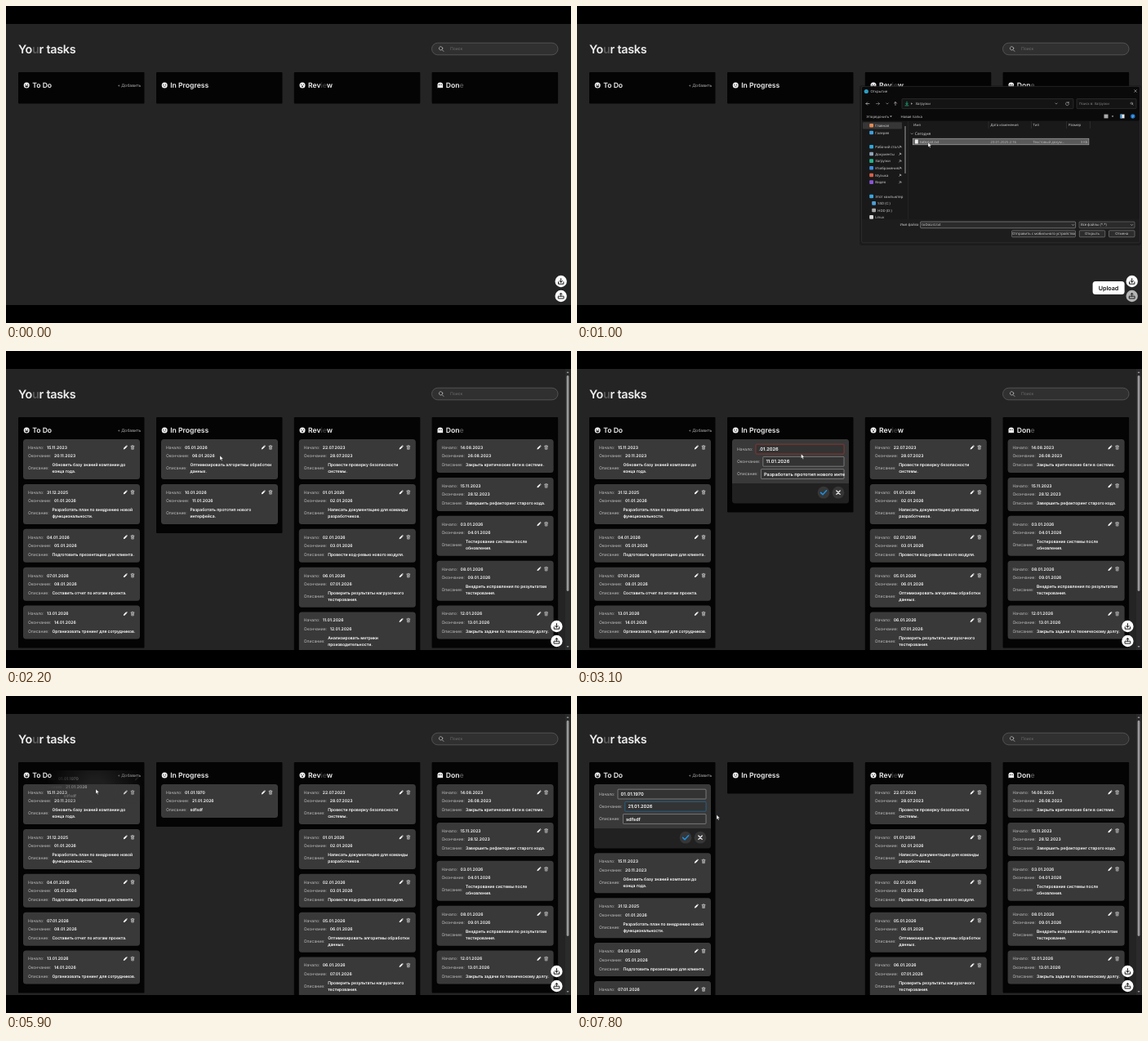
These frames come from a looping animation (692x388 px, 8000 ms). An HTML page:

```html
<!DOCTYPE html>
<html lang="ru">
<head>
<meta charset="utf-8">
<title>Your tasks</title>
<style>
html, body { margin: 0; width: 100%; height: 100%; overflow: hidden; background: #000; }
svg { display: block; width: 692px; height: 388px; }
text { font-family: Inter, sans-serif; text-rendering: geometricPrecision; white-space: pre; }
.win text { font-family: "Open Sans", "Noto Sans", sans-serif; }
</style>
</head>
<body>
<svg id="stage" viewBox="0 0 692 388"></svg>
<script>
const LOOP = 8000, STEP = 100;
const OPEN = 400, PICK = 900, CLOSE = 1200, LOADED = 1300;
const DROP1 = 2000, DROP2 = 2600, EDIT1 = 2900, SAVED = 5100, DROP3 = 6000, EDIT2 = 6900;
const COL_X = [15, 184, 352.8, 521.6], COL_W = 154.5, CARD_W = 143, TOP = 108;
const SMALL = 5.04, INPUT = 5.7;

// start, end, description lines, column
const tasks = [
  ['15.11.2023', '20.11.2023', 'Обновить базу знаний компании до|конца года.', 0],
  ['31.12.2025', '01.01.2026', 'Разработать план по внедрению новой|функциональности.', 0],
  ['04.01.2026', '05.01.2026', 'Подготовить презентацию для клиента.', 0],
  ['07.01.2026', '08.01.2026', 'Составить отчет по итогам проекта.', 0],
  ['13.01.2026', '14.01.2026', 'Организовать тренинг для сотрудников.', 0],
  ['01.01.2026', '02.01.2026', 'Написать документацию для команды|разработчиков.', 1],
  ['05.01.2026', '06.01.2026', 'Оптимизировать алгоритмы обработки|данных.', 1],
  ['10.01.2026', '11.01.2026', 'Разработать прототип нового|интерфейса.', 1],
  ['22.07.2023', '28.07.2023', 'Провести проверку безопасности|системы.', 2],
  ['02.01.2026', '03.01.2026', 'Провести код-ревью нового модуля.', 2],
  ['06.01.2026', '07.01.2026', 'Проверить результаты нагрузочного|тестирования.', 2],
  ['11.01.2026', '12.01.2026', 'Анализировать метрики|производительности.', 2],
  ['14.08.2023', '26.08.2023', 'Закрыть критические баги в системе.', 3],
  ['15.11.2023', '28.12.2023', 'Завершить рефакторинг старого кода.', 3],
  ['03.01.2026', '04.01.2026', 'Тестирование системы после|обновления.', 3],
  ['08.01.2026', '09.01.2026', 'Внедрить исправления по результатам|тестирования.', 3],
  ['12.01.2026', '13.01.2026', 'Закрыть задачи по техническому долгу.', 3]
].map(([start, end, text, col], id) => ({ id, start, end, text, col }));
const FIRST = 5, SECOND = 6, EDITED = 7;

const drags = [[FIRST, 1700, DROP1], [SECOND, 2300, DROP2], [EDITED, 5300, DROP3]];

// time, x, y
const path = [
  [400, 676, 345], [900, 430, 167], [1200, 430, 167], [1500, 353, 170], [1700, 265, 125],
  [2000, 425, 165], [2200, 262, 128], [2300, 262, 128], [2600, 430, 250], [2850, 315, 117],
  [2900, 315, 117], [3100, 274.5, 126], [3700, 274.5, 128], [4000, 275, 134], [4200, 275, 134],
  [4700, 275, 147], [4800, 275, 149], [5000, 301, 171], [5100, 301, 171], [5300, 265, 131],
  [5900, 110, 114], [6000, 108, 115], [6400, 120, 130], [6600, 122, 130], [6900, 146, 117],
  [7300, 150, 138], [7500, 130, 134], [7800, 171, 145.5], [8000, 171, 145.5]
];

// typed values: the last entry whose time has come
const startText = [[0, '10.01.2026'], [3000, '0.01.2026'], [3100, '.01.2026'], [3600, '2.01.2026']];
const endText = [[0, '11.01.2026'], [4200, '1.01.2026'], [4300, '.01.2026'], [4400, '2.01.2026'], [4500, '21.01.2026']];
const noteText = [[0, 'Разработать прототип нового инте'], [4800, ''], [4900, 'sdf'], [5000, 'sdfsdf']];
const at = (list, t) => list.filter(e => e[0] <= t).pop()[1];

const rect = (x, y, w, h, fill, r = 0, extra = '') =>
  `<rect x="${x}" y="${y}" width="${w}" height="${h}" rx="${r}" fill="${fill}" ${extra}/>`;
const box = (x, y, w, h, fill, line, r = 0) => rect(x, y, w, h, fill, r, `stroke="${line}" stroke-width=".6"`);
const dot = (x, y, r, fill) => `<circle cx="${x}" cy="${y}" r="${r}" fill="${fill}"/>`;
const line = (x, y, d, color, w = .8) =>
  `<path transform="translate(${x} ${y})" d="${d}" fill="none" stroke="${color}" stroke-width="${w}" stroke-linecap="round" stroke-linejoin="round"/>`;
const shape = (x, y, d, fill) => `<path transform="translate(${x} ${y})" d="${d}" fill="${fill}"/>`;
// y is the middle of the capitals
const text = (x, y, s, size = SMALL, fill = '#f4f4f4', weight = 400, extra = '') =>
  `<text x="${x}" y="${y + size * .36}" font-size="${size}" fill="${fill}" font-weight="${weight}" ${extra}>${s}</text>`;
const dim = (s, fill) => `<tspan fill="${fill}">${s}</tspan>`;

function cursorAt(t) {
  const i = Math.max(1, path.findIndex(p => p[0] >= t));
  const [t0, x0, y0] = path[i - 1], [t1, x1, y1] = path[i];
  const k = Math.max(0, (t - t0) / (t1 - t0));
  return [x0 + (x1 - x0) * k, y0 + (y1 - y0) * k];
}

const arrow = (x, y) =>
  `<path transform="translate(${x} ${y})" d="M0 0V5.6L1.3 4.4 2.2 6.4 3.1 6 2.2 4.1H4Z" fill="#fff" stroke="#111" stroke-width=".3"/>`;
const beam = (x, y) => line(x, y, 'M-1 -2.5H1M0 -2.5V2.5M-1 2.5H1', '#999', .4);

function face(x, y, kind) {
  if (kind == 3) {
    return shape(x, y, 'M-3.3 3.5V-.3A3.3 3.3 0 0 1 3.3 -.3V3.5L2 2.8 1 3.5 0 2.8 -1 3.5 -2 2.8Z', '#f4f4f4') +
      dot(x - 1.2, y - .6, .6, '#111') + dot(x + 1.2, y - .6, .6, '#111');
  }
  const mouth = [shape(x, y, 'M-2 .4H2A2 2 0 0 1 -2 .4Z', '#111'),
    line(x, y, 'M-1.6 .9Q0 2.6 1.6 .9', '#111', .6),
    dot(x, y + 1.3, .9, '#111')][kind];
  return dot(x, y, 3.5, '#f4f4f4') + dot(x - 1.3, y - .9, .6, '#111') + dot(x + 1.3, y - .9, .6, '#111') + mouth;
}

const pencil = (x, y) => shape(x, y, 'M-2.4 2.4L-2 .7 .8 -2 2 -.8 -.7 2Z M1.1 -2.3L1.7 -2.7 2.7 -1.7 2.3 -1.1Z', '#fff');
const bin = (x, y) => line(x, y, 'M-2 -1.6H2M-.7 -2.3H.7M-1.5 -1.4L-1.3 2.3H1.3L1.5 -1.4M-.4 -.4V1.3M.5 -.4V1.3', '#e4e4e4', .55);
const lens = (x, y, s, color, w) => line(x, y, `M${s} ${s}L${s * .4} ${s * .4}M${s * .6} ${-s * .2}A${s * .75} ${s * .75} 0 1 1 ${s * .6} ${-s * .25}Z`, color, w);
const label = (x, y, s) => text(x + 5.9, y, s, SMALL, '#bdbdbd');

function card(c, x, y) {
  const lines = c.text.split('|');
  return rect(x, y, CARD_W, c.h, '#393939', 3.5) +
    label(x, y + 10, 'Начало:') + text(x + 29, y + 10, c.start, SMALL, '#fff', 600) +
    label(x, y + 20.6, 'Окончание:') + text(x + 38, y + 20.6, c.end, SMALL, '#fff', 600) +
    label(x, y + 31.6 + (lines.length - 1) * 4, 'Описание:') +
    lines.map((s, i) => text(x + 35.4, y + 31.6 + i * 8, s, SMALL, '#fff', 600)).join('') +
    pencil(x + 125.2, y + 10) + bin(x + 134, y + 10);
}

function field(x, y, right, s, border) {
  return box(x, y, right - x, 11.8, '#333', border, .8) + text(x + 3.6, y + 5.9, s, INPUT, '#fff', 600);
}

function editor(x, y, t) {
  const again = t >= EDIT2, grey = '#a5a5a5', blue = '#1f79b5';
  const red = t < 3900 ? '#b8362c' : '#7e2e2a';
  const onEnd = again ? t >= 7500 : t >= 3900 && t < 4800;
  const end = again ? '21.01.2026' : at(endText, t);
  const right = x + 137;
  return rect(x, y, CARD_W, 78.4, '#212121', 3.5) +
    shape(x, y, `M0 54V3.5A3.5 3.5 0 0 1 3.5 0H${CARD_W - 3.5}A3.5 3.5 0 0 1 ${CARD_W} 3.5V54Z`, '#393939') +
    label(x, y + 12.2, 'Начало:') +
    field(x + 29, y + 6.2, right, again ? '01.01.1970' : at(startText, t), again || t < 3000 ? grey : red) +
    label(x, y + 27.4, 'Окончание:') + field(x + 37.8, y + 21.4, right, end, onEnd ? blue : grey) +
    (onEnd && end.length > 9 ? rect(x + 47.5, y + 24.8, .4, 5, '#ccc') : '') +
    label(x, y + 42.6, 'Описание:') +
    field(x + 35.4, y + 36.6, right, again ? 'sdfsdf' : at(noteText, t), !again && t >= 4800 ? blue : grey) +
    dot(x + 112, y + 65.2, 7.4, '#363636') + line(x + 112, y + 65.2, 'M-3.4 .2L-1 2.6 3.6 -2.4', '#1d8fe3', 1.5) +
    dot(x + 130, y + 65.2, 7.4, '#363636') + line(x + 130, y + 65.2, 'M-2.2 -2.2L2.2 2.2M2.2 -2.2L-2.2 2.2', '#eee', 1.3);
}

// Columns, order and positions of the cards at a given time
function layout(t) {
  const editing = t >= EDIT1 && t < SAVED || t >= EDIT2;
  const moved = { [FIRST]: [DROP1, 2], [SECOND]: [DROP2, 2], [EDITED]: [DROP3, 0] };
  const key = c => c.start.split('.').reverse().join('');
  const ends = [TOP, TOP, TOP, TOP];
  const cards = t < LOADED ? [] : tasks.map(task => {
    const c = { ...task }, move = moved[c.id];
    if (move && t >= move[0]) c.col = move[1];
    if (c.id == EDITED && t >= SAVED) Object.assign(c, { start: '01.01.1970', end: '21.01.2026', text: 'sdfsdf' });
    c.edit = editing && c.id == EDITED;
    c.h = c.edit ? 78.4 : c.text.includes('|') ? 49 : 41;
    return c;
  }).sort((a, b) => key(a) < key(b) ? -1 : 1);
  for (const c of cards) {
    c.x = COL_X[c.col] + 6;
    c.y = ends[c.col];
    ends[c.col] += c.h + 5.9;
  }
  return { cards, bottoms: ends.map(e => e == TOP ? 119.5 : e + 5.1) };
}

function board(t) {
  const { cards, bottoms } = layout(t);
  const names = ['To Do', 'In Progress', `Rev${dim('ie', '#3c3c3c')}w`, `Don${dim('e', '#555')}`];
  return rect(0, 22, 692, 344, '#242424') +
    text(15, 52.5, `Yo${dim('u', '#5a5a5a')}r tasks`, 14.4, '#eee', 600, 'letter-spacing="-.28"') +
    box(521.5, 45.2, 154.5, 14.6, '#303030', '#6c6c6c', 7.3) + lens(533, 52.5, 2.9, '#bbb', .8) +
    text(544, 52.6, 'Поиск', SMALL, '#6d6d6d') +
    names.map((name, i) => rect(COL_X[i], 81, COL_W, bottoms[i] - 81, '#040405', 1) +
      face(COL_X[i] + 10.2, 97, i) + text(COL_X[i] + 17.2, 97.2, name, 8.64, '#f0f0f0', 600)).join('') +
    text(136.5, 97.3, '+ Добавить', SMALL, '#b0b0b0') +
    cards.map(c => c.edit ? editor(c.x, c.y, t) : card(c, c.x, c.y)).join('');
}

function buttons(t) {
  const scroll = t >= DROP1, x = scroll ? 674.4 : 679.7, hover = t >= 100 && t < LOADED;
  const tray = 'M-3.2 .8V3.2H3.2V.8';
  let out = '';
  if (scroll) {
    out += rect(685, 22, 6, 344, '#2b2b2b') + rect(686.6, 30, 2.8, t >= DROP3 && t < EDIT2 ? 258 : 264, '#9a9a9a', 1.4) +
      shape(688, 26, 'M-1.5 1L0 -1 1.5 1Z', '#9a9a9a') + shape(688, 362, 'M-1.5 -1L0 1 1.5 -1Z', '#9a9a9a');
  }
  out += dot(x, 337, 7.2, '#fff') + line(x, 337, tray + 'M0 -3.4V1M-1.8 -.6L0 1.2 1.8 -.6', '#111', 1) +
    dot(x, 355, 7.2, hover ? '#b5b5b5' : '#fff') +
    line(x, 355, 'M-3.4 .6V3H3.4V.6ZM0 .4V-3.4M-1.5 -2L0 -3.6 1.5 -2', '#222', 1);
  if (hover) {
    out += `<g opacity="${t < 200 ? .5 : 1}">` + rect(631.6, 337, 39, 16, '#fff', 3.5) +
      text(651, 345, 'Upload', 7.2, '#111', 600, 'text-anchor="middle"') + '</g>';
  }
  return out;
}

function dialog(t) {
  const picked = t >= PICK, S = 4.3, pale = '#d8d8d8';
  const say = (x, y, s, fill = pale, extra) => text(x, y, s, S, fill, 400, extra);
  const chevron = (x, y) => line(x, y, 'M-1.2 -.6L0 .6 1.2 -.6', pale, .5);
  const pin = y => line(396, y, 'M-1.4 1.4L0 0M-.8 -.8L.8 .8M0 -1.2L1.2 0', pale, .6);
  const places = [
    [146.3, 'Главная', '#e58a55'], [155, 'Галерея', '#3f9fe0'], [172.3, 'Рабочий стол', '#2fa8dc', 1],
    [181, 'Документы', '#8fa6bb', 1], [189.6, 'Загрузки', '#21b58a', 1], [198.3, 'Изображения', '#3d8fe0', 1],
    [207, 'Музыка', '#d9604a', 1], [215.6, 'Видео', '#8b54d6', 1], [233, 'Этот компьютер', '#39a5df'],
    [241.4, 'SSD (C:)', '#4b9fd8', 0, 3], [250, 'HDD (D:)', '#aaa', 0, 3], [258.4, 'Linux', '#ddd']
  ];
  const button = (x, w, s) => box(x, 274.8, w, 8, '#2c2c2c', '#8a8a8a', 1) + say(x + w / 2, 278.8, s, pale, 'text-anchor="middle"');
  return `<g class="win" opacity="${t < OPEN + STEP ? .7 : 1}">` +
    rect(346, 97, 345, 196, '#000', 3, 'opacity=".25"') +
    box(348.6, 98.4, 340.8, 191.4, '#1d1d1d', '#3a3a3a', 2) + rect(349, 98.8, 340, 42, '#0a0a0b', 2) +
    dot(354.3, 104.5, 2.6, '#2a9fc4') + say(359.5, 104.5, 'Открытие') +
    line(684, 104, 'M-1.4 -1.4L1.4 1.4M1.4 -1.4L-1.4 1.4', pale, .5) +
    line(356, 119.5, 'M2 0H-2M-.4 -1.6L-2 0 -.4 1.6', pale, .6) +
    line(368.5, 119.5, 'M-2 0H2M.4 -1.6L2 0 .4 1.6', '#999', .6) +
    chevron(380, 119.5) + line(390, 119.5, 'M0 2V-2M-1.6 -.4L0 -2 1.6 -.4', pale, .6) +
    box(398, 113.6, 210, 12, '#141414', '#3c3c3c', 1) +
    line(404, 119.5, 'M0 -2.4V1M-1.4 -.4L0 1 1.4 -.4M-2 2.4H2', '#21b58a', .8) +
    shape(410, 119.5, 'M-.7 -1.2L.8 0 -.7 1.2Z', pale) + say(414.5, 119.5, 'Загрузки') +
    chevron(587, 119.5) + line(600.5, 119.5, 'M1.6 -1A2 2 0 1 0 2 .4M1.7 -2.2V-.8H.4', pale, .5) +
    box(612, 113.6, 73, 12, '#141414', '#3c3c3c', 1) + say(615, 119.5, 'Поиск в: Загрузки', '#8c8c8c') + lens(679.5, 119.5, 1.6, pale, .5) +
    say(354.5, 135, 'Упорядочить') + shape(384.5, 135, 'M-1.3 -.6H1.3L0 .9Z', pale) + say(396.5, 135, 'Новая папка') +
    rect(645.5, 132.6, 5, 4.8, '#aaa') + shape(656, 135, 'M-1.2 -.6H1.2L0 .9Z', pale) +
    rect(665.5, 132.6, 5, 4.8, '#e8e8e8') + rect(665.5, 132.6, 2, 4.8, '#3a8fd0') +
    dot(680.8, 135, 2.7, '#1b78cf') + say(679.8, 135, '?', '#fff') +
    rect(349, 140.8, 340, 120.4, '#191919') + rect(350, 142.2, 48, 8.2, '#363636', 1) +
    places.map(([y, s, color, pinned, indent = 0]) =>
      rect(358.2 + indent, y - 2.3, 4.8, 4.6, color, 1) + say(365.3 + indent, y, s) + (pinned ? pin(y) : '')).join('') +
    rect(401.4, 147, 1.2, 58, '#8a8a8a', .6) + rect(405, 141, .4, 120, '#333') +
    [[412, 'Имя'], [506.5, 'Дата изменения'], [558.5, 'Тип'], [602, 'Размер']].map(([x, s]) => say(x, 145.6, s)).join('') +
    [503.8, 556, 599.5, 628].map(x => rect(x, 141, .4, 9, '#444')).join('') +
    chevron(410.3, 156.4) + text(413.8, 156.4, 'Сегодня', 4.9, pale) +
    (picked ? box(411.3, 162.2, 215.6, 7.6, '#5a5a5a', '#b8b8b8') : '') +
    rect(413.8, 163.4, 4, 5, '#eee', .4) + say(420, 166, 'toDoList.txt') + say(506.5, 166, '23.01.2025 2:16', '#bbb') +
    say(558.5, 166, 'Текстовый докум...', '#bbb') + say(625.5, 166, '3 КБ', '#bbb', 'text-anchor="end"') +
    say(418.5, 267.8, 'Имя файла', pale, 'text-anchor="end"') + box(420.6, 264, 190, 7.8, '#2a2a2a', '#a0a0a0', 1) +
    (picked ? say(422.3, 267.8, 'toDoList.txt') : '') + chevron(607.5, 268) +
    box(615, 264, 68, 7.8, '#2a2a2a', '#777', 1) + say(617, 267.8, 'Все файлы (*.*)') + chevron(679.5, 268) +
    button(532.5, 78, 'Отправить с мобильного устройства') + button(615.3, 31.4, 'Открыть') + button(651.5, 31.5, 'Отмена') + '</g>';
}

function ghost(t) {
  const drag = drags.find(([, from, to]) => t > from && t < to);
  if (!drag) return '';
  const c = layout(t).cards.find(c => c.id == drag[0]);
  const [gx, gy] = cursorAt(drag[1]), [x, y] = cursorAt(t);
  return `<defs><radialGradient id="fade" gradientUnits="userSpaceOnUse" cx="${x}" cy="${y}" r="62">
    <stop offset=".2" stop-color="#fff"/><stop offset="1" stop-color="#000"/></radialGradient>
    <mask id="soft" maskUnits="userSpaceOnUse" x="0" y="0" width="692" height="388">${rect(0, 0, 692, 388, 'url(#fade)')}</mask></defs>
    <g mask="url(#soft)"><g opacity=".5">${card(c, c.x + x - gx, c.y + y - gy)}</g></g>`;
}

function scene(t) {
  const [x, y] = cursorAt(t);
  const pointer = t < OPEN ? '' : t >= 4000 && t < 4900 ? beam(x, y) : arrow(x, y);
  return `<clipPath id="view">${rect(0, 22, 692, 344, '#fff')}</clipPath><g clip-path="url(#view)">` +
    board(t) + buttons(t) + (t >= OPEN && t < CLOSE ? dialog(t) : '') + ghost(t) + pointer + '</g>';
}

const stage = document.getElementById('stage');
const begin = performance.now();
let shown = -1;
function tick() {
  const t = Math.floor((performance.now() - begin) % LOOP / STEP) * STEP;
  if (t != shown) stage.innerHTML = scene(shown = t);
  requestAnimationFrame(tick);
}
tick();
</script>
</body>
</html>
```
